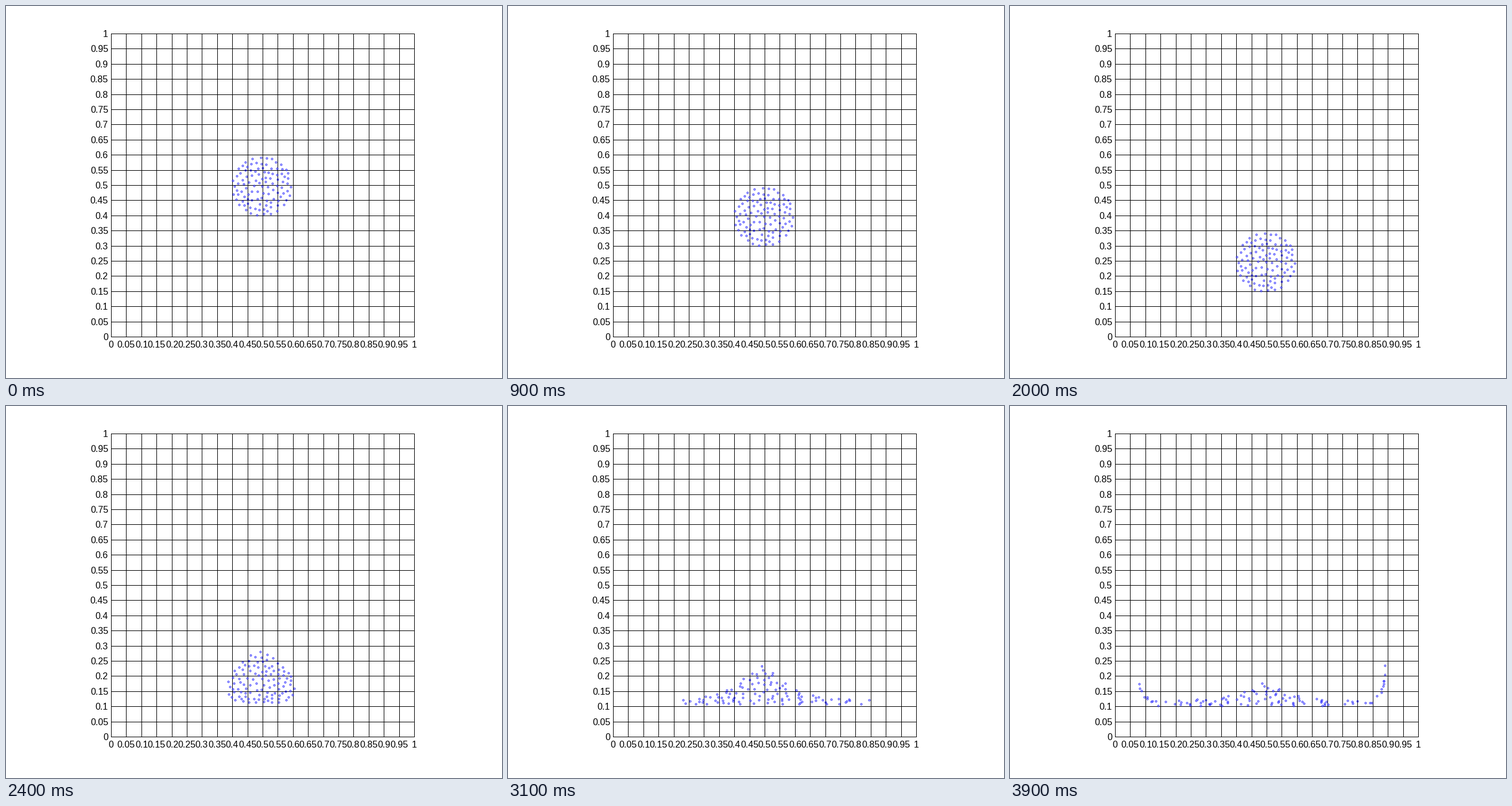
Write a matplotlib script that moves like this. It is 864x648 px and loops after 4 s.

```python
import numpy as np
import matplotlib.pyplot as plt
from matplotlib.animation import FuncAnimation

W, H, DPI = 864, 648, 100
FRAMES, INTERVAL = 40, 100
PT = 72 / DPI                     # points per pixel
LEFT, TOP, SIDE = 183, 48, 528    # plot box in pixels
BASE = TOP + SIDE
CX, CY, R = 445.5, 314.0, 51.5    # drop centre and radius
COUNT = 105                       # particles
IMPACT = 20                       # step at which the drop meets the floor

plt.rcParams["font.family"] = "Liberation Sans"
fig = plt.figure(figsize=(W / DPI, H / DPI), dpi=DPI, facecolor="white")
ax = fig.add_axes([0, 0, 1, 1])
ax.set_xlim(0, W)
ax.set_ylim(H, 0)
ax.axis("off")


def draw_grid():
    line = dict(color="black", lw=PT, snap=False, solid_capstyle="butt", zorder=1)
    text = dict(fontsize=16 * PT, color="black", va="baseline")
    for i in range(21):
        step = SIDE * i / 20
        x, y = round(LEFT + step), round(BASE - step)
        ax.plot([x + 0.5, x + 0.5], [TOP, BASE + 1], **line)
        ax.plot([LEFT, LEFT + SIDE + 1], [y + 0.5, y + 0.5], **line)
        label = f"{i / 20:g}"
        ax.text(x, 595, label, ha="center", **text)
        ax.text(178, y + 6, label, ha="right", **text)


def make_drop():
    """Fill the disc evenly: each new particle keeps far from the others."""
    rng = np.random.default_rng(4)
    pts = np.array([[CX, CY]])
    while len(pts) < COUNT:
        ang = rng.uniform(0, 2 * np.pi, 80)
        rad = R * np.sqrt(rng.uniform(0, 1, 80))
        new = np.c_[CX + rad * np.cos(ang), CY + rad * np.sin(ang)]
        gap = np.linalg.norm(new[:, None] - pts, axis=2).min(axis=1)
        pts = np.vstack([pts, new[gap.argmax()]])
    return pts


drop = make_drop()
dx = drop[:, 0] - CX
height = (BASE + 0.5 - drop[:, 1]) / SIDE
half = np.sqrt((R + 3) ** 2 - dx ** 2)
level = (CY + half - drop[:, 1]) / (2 * half)  # 0 bottom, 1 top of the column
is_left = dx < 0
wall = np.where(is_left, 223, 208)             # reach to each side


def positions(n):
    t = max(n - IMPACT, 0)

    # sideways spread, faster at the rim, braked softly by the walls
    s2 = (dx / 52) ** 2
    jet = max(t - 4, 0) * s2
    to_left = 1 + 0.0155 * t ** 1.75 + 0.12 * jet
    to_right = 1 + 0.105 * max(t - 3, 0) + 0.27 * jet
    dist = np.abs(dx) * np.where(is_left, to_left, to_right)
    brake = 32
    over = np.maximum(dist - (wall - brake), 0)
    off = np.sign(dx) * (dist - over + brake * (1 - np.exp(-over / brake)))

    # accelerated fall onto a soft floor
    fall = height - 0.01 * n - 0.000127 * n ** 2
    fall = 0.11 + 0.012 * np.logaddexp(0, (fall - 0.11) / 0.012)

    # collapsing mound with a thin sheet and splashes at the walls
    floor = 0.112 - 0.0005 * t
    peak = 0.205 - 0.0075 * t
    top = 0.117 + peak / (1 + ((off + 4) / 42) ** 2)
    mound = floor + level * (top - floor) + 0.0008 * over

    u = min(t / 8, 1)
    y = fall + (mound - fall) * u * u * (3 - 2 * u)
    return CX + off, BASE + 0.5 - SIDE * y


draw_grid()
dots, = ax.plot([], [], ls="none", marker="o", ms=3 * PT, mfc="none",
                mec="blue", mew=0.8 * PT, zorder=3)


def update(n):
    dots.set_data(*positions(n))
    return dots,


anim = FuncAnimation(fig, update, frames=FRAMES, interval=INTERVAL,
                     repeat=True, repeat_delay=0)
plt.show()
```
